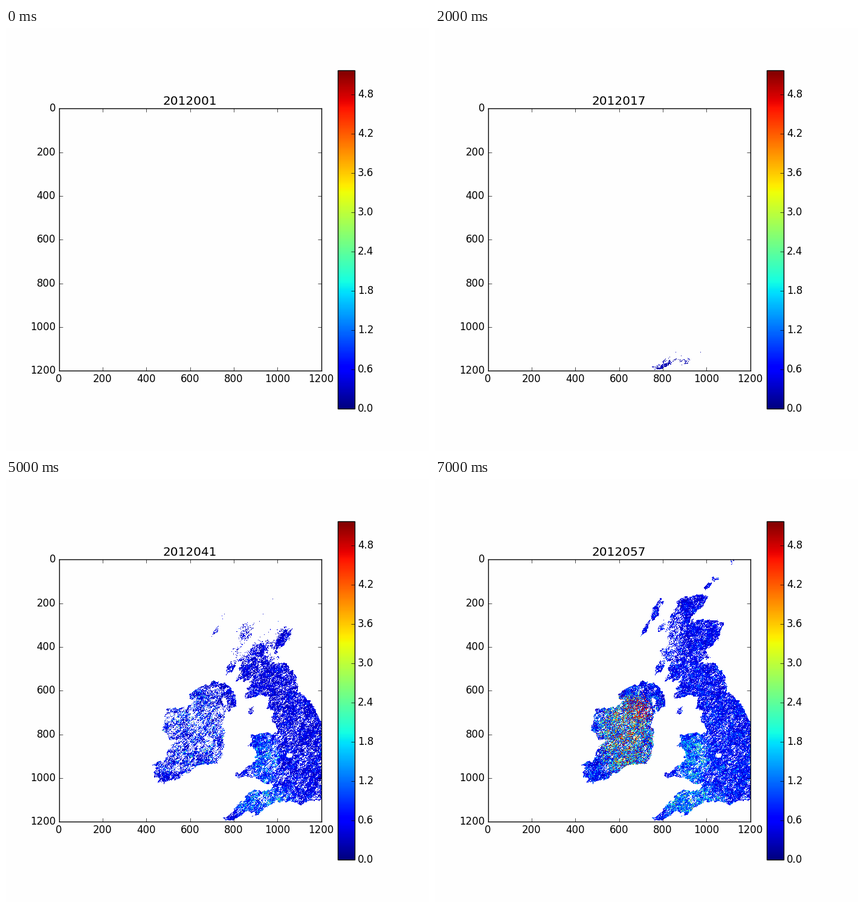
A matplotlib script for the animation above (8000 ms loop, 700 px wide and 700 px high).

```python
import numpy as np
import matplotlib.pyplot as plt
from matplotlib.animation import FuncAnimation
from matplotlib.path import Path

plt.style.use("classic")
plt.rcParams["font.family"] = "DejaVu Sans"

N = 434                 # map cells per side, one per screen pixel
LEFT, TOP = 88, 133     # screen position of the map corner
VMAX = 5.17
PAPER = "#fefefe"

# Key points of the coasts in screen pixels; noise adds the detail
BRITAIN = [
    (407, 195), (450, 191), (452, 199), (421, 234), (455, 234), (478, 236),
    (466, 267), (450, 286), (457, 294), (435, 303), (460, 305), (478, 323),
    (483, 350), (511, 376), (521, 400), (530, 410), (530, 530), (497, 535),
    (487, 540), (478, 534), (440, 536), (417, 556), (397, 549), (377, 567),
    (362, 563), (402, 521), (412, 515), (436, 516), (447, 500), (432, 505),
    (408, 493), (382, 494), (381, 488), (405, 476), (414, 460), (412, 441),
    (400, 444), (406, 434), (401, 421), (447, 422), (448, 409), (442, 400),
    (445, 387), (432, 380), (436, 358), (412, 360), (394, 362), (407, 328),
    (380, 336), (390, 308), (371, 284), (388, 275), (384, 262), (388, 226),
    (401, 209)]
IRELAND = [
    (341, 335), (309, 350), (303, 364), (313, 368), (300, 378), (266, 380),
    (259, 413), (268, 431), (285, 431), (262, 458), (262, 467), (243, 473),
    (250, 479), (244, 488), (256, 502), (278, 498), (322, 473), (350, 471),
    (363, 440), (358, 400), (366, 385), (383, 376), (376, 354), (369, 341)]

# Slanted ellipses: x, y, half length, half width
ISLANDS = [(368, 215, 18, 6), (349, 247, 17, 3), (375, 246, 12, 5),
           (372, 311, 14, 4), (405, 383, 8, 3), (451, 177, 9, 4),
           (464, 164, 6, 3), (493, 136, 3, 1)]

# Soft ellipses: x, y, rx, ry
LAKES = [(470, 457, 6, 4), (363, 430, 4, 5), (362, 368, 4, 6)]
IRISH = (312, 420, 78, 92)
IRISH_PLAIN = (317, 425, 45, 70)
ULSTER = (340, 380, 24, 20)
HIGHLANDS = (390, 255, 24, 65)
WALES = (428, 462, 26, 44)
SOUTHWEST = (420, 530, 55, 26)

# The data front moves north: front y, softness, cover in Britain and Ireland,
# base level, rise in the west of Britain, rise in Ireland, saturated share
DATES = [
    (700, 3, 0.0, 0.0, 0.2, 0.0, 0.0, 0.0),
    (700, 3, 0.0, 0.0, 0.2, 0.0, 0.0, 0.0),
    (546, 3, 0.4, 0.4, 0.2, 0.0, 0.0, 0.0),
    (490, 18, 0.45, 0.3, 0.35, 0.3, 0.0, 0.0),
    (412, 13, 0.88, 0.55, 0.65, 0.55, 0.3, 0.08),
    (270, 18, 0.8, 0.55, 0.45, 0.5, 0.15, 0.0),
    (0, 20, 0.88, 0.88, 0.7, 0.25, 0.75, 0.13),
    (0, 20, 0.86, 0.88, 0.62, 0.5, 0.75, 0.17),
]

rng = np.random.default_rng(12)
ROWS, COLS = np.mgrid[0:N, 0:N]
PX, PY = COLS + LEFT + 0.5, ROWS + TOP + 0.5


def white():
    return rng.normal(size=(N, N))


def smooth(along, across):
    """Unit-variance noise, stretched from lower left to upper right."""
    fy, fx = np.meshgrid(np.fft.fftfreq(N), np.fft.fftfreq(N), indexing="ij")
    u, v = (fx - fy) / np.sqrt(2), (fx + fy) / np.sqrt(2)
    kernel = np.exp(-2 * np.pi**2 * ((u * along)**2 + (v * across)**2))
    field = np.fft.ifft2(np.fft.fft2(white()) * kernel).real
    return field / field.std()


def ranked(field):
    """Spread values evenly over 0..1."""
    return (field.ravel().argsort().argsort() / field.size).reshape(field.shape)


def patch(x, y, rx, ry):
    return np.exp(-(((PX - x) / rx)**2 + ((PY - y) / ry)**2)**3)


def land_mask():
    x = PX + 1.5 * smooth(2.5, 1.5) + 0.3 * white()
    y = PY + 1.5 * smooth(2.5, 1.5) + 0.3 * white()
    points = np.column_stack([x.ravel(), y.ravel()])
    mask = np.zeros((N, N), bool)
    for coast in (BRITAIN, IRELAND):
        mask |= Path(coast).contains_points(points).reshape(N, N)
    c, s = np.cos(np.pi / 3), np.sin(np.pi / 3)
    for cx, cy, length, width in ISLANDS:
        u = ((x - cx) * c - (y - cy) * s) / length
        v = ((x - cx) * s + (y - cy) * c) / width
        mask |= u**2 + v**2 < 1
    return mask


LAND = land_mask()
GAPS = 0.9 * sum(patch(*lake) for lake in LAKES) + 0.25 * patch(*HIGHLANDS)
THRESHOLD = ranked(0.5 * smooth(1.8, 0.8) + 0.3 * smooth(6, 4) + 0.8 * white())
DRIFT = smooth(12, 8)
IN_IRELAND = patch(*IRISH)
SPREAD = 0.45 + 0.2 * IN_IRELAND
SOUTHING = 0.75 + 0.4 * ROWS / N


def make_map(front, soft, britain, ireland, base, west, irish, hot):
    arrived = 0.5 + 0.5 * np.tanh((PY - front) / soft + DRIFT)
    cover = arrived * (britain + (ireland - britain) * IN_IRELAND) - GAPS
    seen = LAND & (THRESHOLD < cover)
    mean = (base * SOUTHING + west * (patch(*WALES) + patch(*SOUTHWEST))
            + irish * patch(*IRISH_PLAIN))
    value = mean * np.exp(SPREAD * (0.9 * white() + 0.4 * smooth(2, 1.5)))
    burnt = rng.random((N, N)) < hot * (patch(*IRISH_PLAIN)
                                        + 1.5 * patch(*ULSTER))
    value[burnt] = VMAX * rng.uniform(0.85, 1, burnt.sum())
    return np.ma.masked_where(~seen, value)


MAPS = [make_map(*date) for date in DATES]

fig = plt.figure(figsize=(7, 7), dpi=100, facecolor=PAPER)
ax = fig.add_axes([0.125, 0.18965, 0.62, 0.62], facecolor=PAPER)
image = ax.imshow(MAPS[0], cmap="jet", vmin=0, vmax=VMAX, aspect="auto",
                  interpolation="nearest", extent=(0, 1200, 1200, 0))
ax.set_xticks(range(0, 1201, 200))
ax.set_yticks(range(0, 1201, 200))
ax.tick_params(axis="x", pad=3.4)
title = ax.set_title("2012001", pad=4.5)
cax = fig.add_axes([0.78375, 0.1, 0.04, 0.8])
bar = fig.colorbar(image, cax=cax, ticks=np.arange(9) * 0.6, format="%.1f")


def update(i):
    image.set_data(MAPS[i])
    title.set_text(str(2012001 + 8 * i))
    return image, title


anim = FuncAnimation(fig, update, frames=len(MAPS), interval=1000,
                     repeat=True, repeat_delay=0, blit=False)
plt.show()
```
